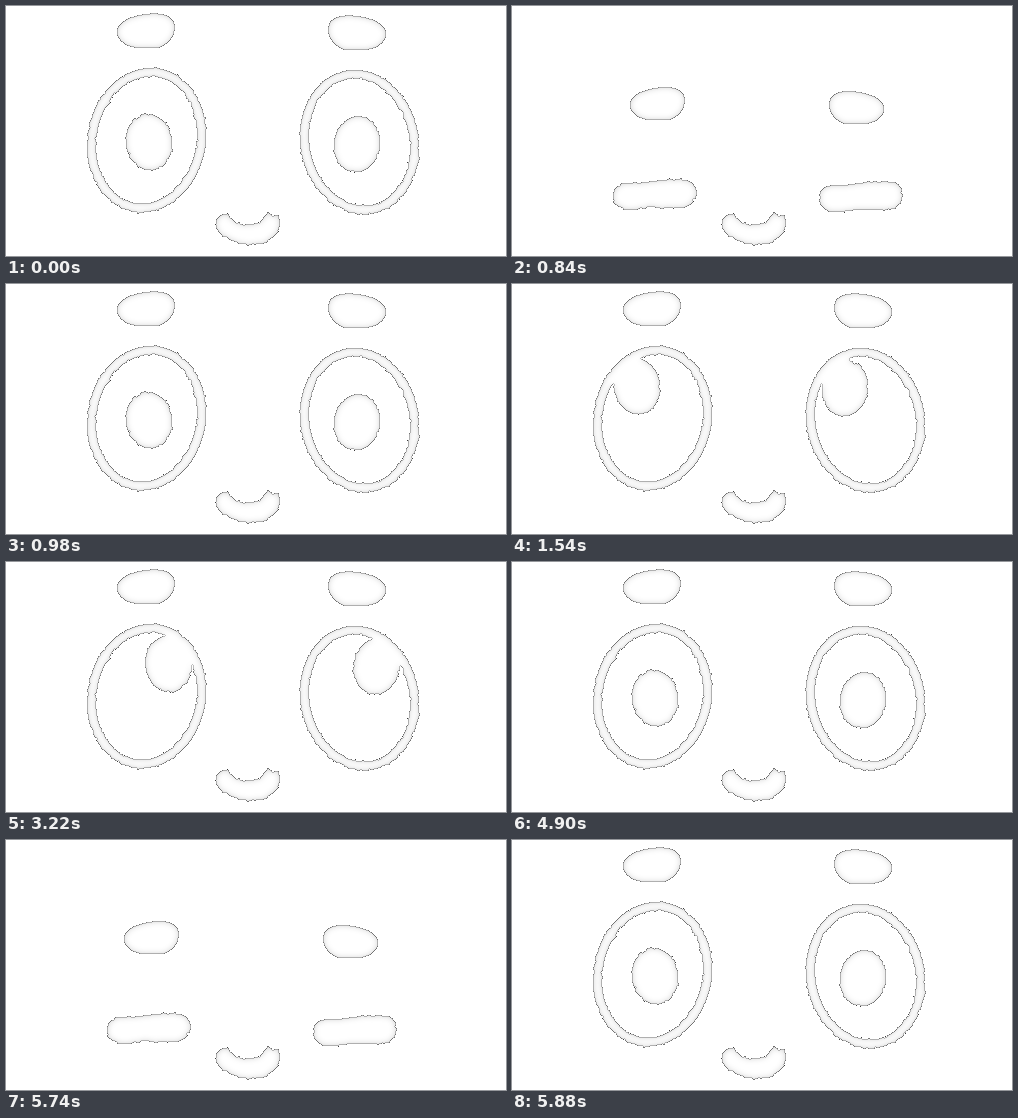
Write an HTML page that moves like this. It is 500x250 px and loops after 6.3 s.

```html
<!DOCTYPE html>
<html lang="en">
<head>
<meta charset="utf-8">
<title>Blinking face</title>
<style>
html, body { margin: 0; width: 100%; height: 100%; overflow: hidden; background: #fff; }
svg { display: block; width: 500px; height: 250px; }
</style>
</head>
<body>
<svg id="stage" viewBox="0 0 500 250"></svg>
<script>
const LOOP = 6300;
const stage = document.getElementById('stage');

// Ragged thin outline with a faint inner shade, on the union of a group's shapes
const sketch = (id, wobble) => `
  <filter id="${id}" filterUnits="userSpaceOnUse" x="0" y="0" width="500" height="250"
      color-interpolation-filters="sRGB">
    <feTurbulence type="fractalNoise" baseFrequency="0.2" numOctaves="1" seed="4" result="noise"/>
    <feDisplacementMap in="SourceGraphic" in2="noise" scale="${wobble}"
      xChannelSelector="R" yChannelSelector="G"/>
    <feComponentTransfer result="solid"><feFuncA type="discrete" tableValues="0 1"/></feComponentTransfer>
    <feConvolveMatrix in="solid" order="3" kernelMatrix="0 -1 0 -1 4 -1 0 -1 0"
      divisor="4" preserveAlpha="false" result="line"/>
    <feGaussianBlur in="solid" stdDeviation="3.2" result="soft"/>
    <feComposite in="solid" in2="soft" operator="arithmetic" k2="0.2" k3="-0.2" result="shade"/>
    <feMerge><feMergeNode in="shade"/><feMergeNode in="line"/></feMerge>
  </filter>`;

const oval = (rx, ry) => `M0,${-ry}A${rx},${ry} 0 0 1 0,${ry}A${rx},${ry} 0 0 1 0,${-ry}Z`;

const outer = oval(59.4, 72.9), inner = oval(49.8, 63.7);
const brow = 'M128,41.5C121,41 113,35 111,29C109,22 114,17 121,13C130,9 139,7.5 147,7.5' +
  'C156,7 163,9 167,14C170,19 169,26 167,30C164,36 159,39 154,41.5Z';
const lid = 'M112,177.5C122,178 134,176 145,174.5C157,173 168,173 176,174C182,177 185,182 185,188' +
  'C184,195 178,201 170,202.5C159,201.5 150,201 140,202C130,203 122,204 115,204.5' +
  'C107,203 101,198 100.5,190C101,183 106,178 112,177.5Z';
const mouth = 'M209.5,216C210,211 214,208 221,208C225,210 227,215 231,217C237,219 245,218 251,217' +
  'C257,216 257,208 263,206.5L267,209.5L272,209C276,214 275,221 271,227' +
  'C266,234 256,239 244,239C232,238 222,234 216,229C211,225 209,221 209.5,216Z';

const eye = (x, y, tilt, side) => `
  <clipPath id="clip${side}"><path d="${outer}" transform="translate(${x} ${y}) rotate(${tilt})"/></clipPath>
  <path d="${outer}${inner}" fill-rule="evenodd" transform="translate(${x} ${y}) rotate(${tilt})"/>
  <g clip-path="url(#clip${side})"><path id="pupil${side}" d="${oval(23.4, 28.3)}"/></g>`;

stage.innerHTML = `
  <defs>${sketch('rough', 3.2)}${sketch('fine', 1.5)}</defs>
  <g filter="url(#rough)">
    <g id="open">${eye(140.5, 134.1, 11, 'L')}${eye(353.5, 136.1, -11, 'R')}</g>
    <g id="shut"><path d="${lid}"/><path d="${lid}" transform="translate(206 2)"/></g>
    <path d="${mouth}"/>
  </g>
  <g filter="url(#fine)"><path id="browL" d="${brow}"/><path id="browR" d="${brow}"/></g>`;

const part = id => document.getElementById(id);
const place = (id, value) => part(id).setAttribute('transform', value);
const show = (id, on) => part(id).setAttribute('display', on ? 'inline' : 'none');
const between = (t, a, b) => t >= a && t < b;

function draw(t) {
  const blink = between(t, 840, 980) || between(t, 5740, 5880);
  const left = between(t, 1540, 3220), right = between(t, 3220, 4900);
  const dx = left ? -18 : right ? 19.5 : 0;
  const dy = left || right ? -34 : 0;

  show('open', !blink);
  show('shut', blink);
  place('pupilL', `translate(${143 + dx} ${136.3 + dy}) rotate(-9)`);
  place('pupilR', `translate(${351 + dx} ${138.3 + dy}) rotate(9)`);

  const size = blink ? 0.95 : 1;
  const browAt = (x, y, flip) =>
    `translate(${x} ${y}) scale(${flip * size} ${size}) translate(-139.5 -24)`;
  place('browL', blink ? browAt(145, 97, 1) : browAt(139.5, 24, 1));
  place('browR', blink ? browAt(345, 101, -1) : browAt(351.5, 26, -1));
}

const start = performance.now();
function tick(now) {
  draw(Math.max(0, now - start) % LOOP);
  requestAnimationFrame(tick);
}
draw(0);
requestAnimationFrame(tick);
</script>
</body>
</html>
```
